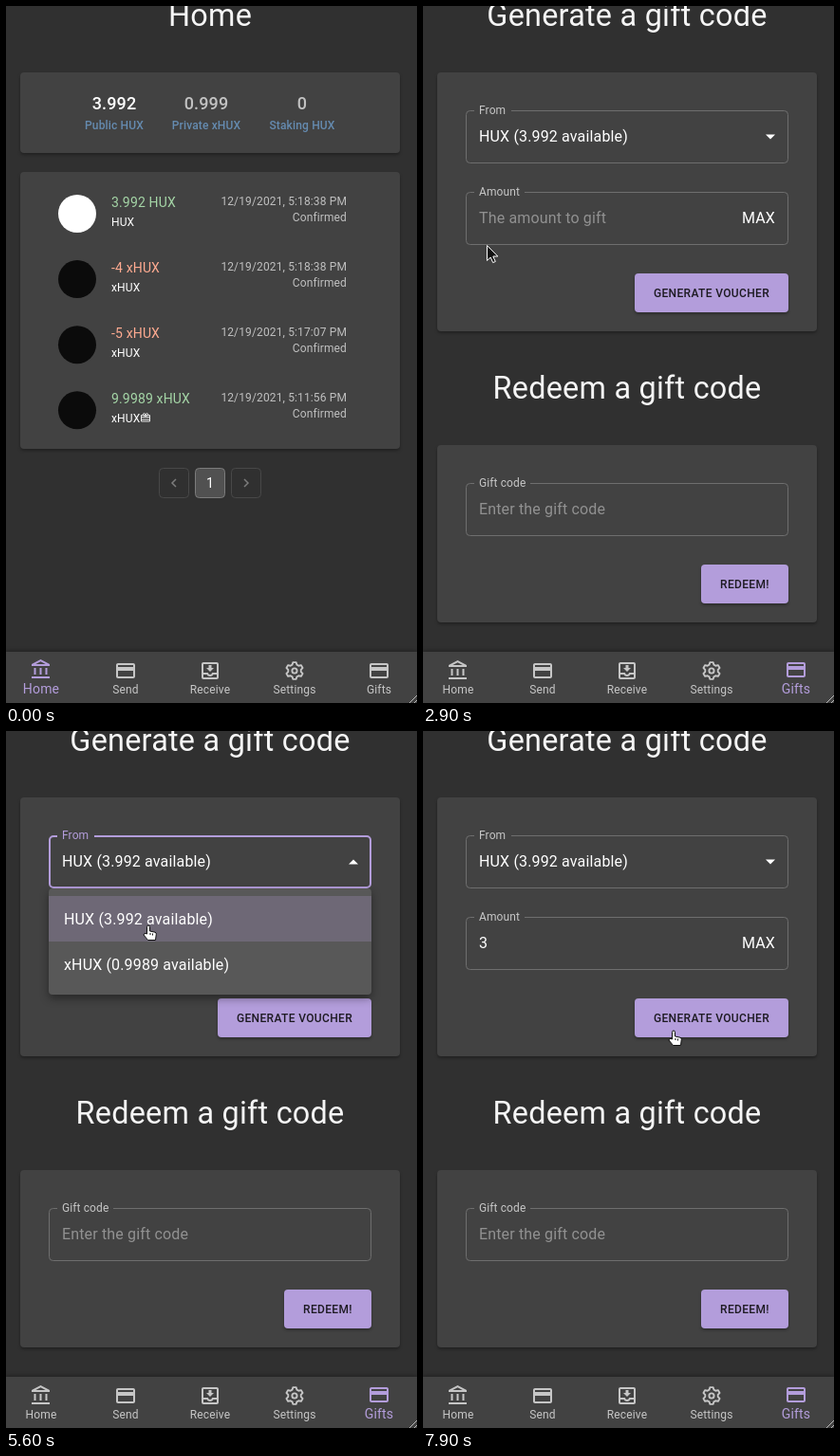
An HTML page that plays this animation: 433 by 735 pixels, repeating every 8000 ms.

```html
<!DOCTYPE html>
<html lang="en">
<head>
<meta charset="utf-8">
<title>Wallet gift codes</title>
<style>
html, body { margin: 0; width: 100%; height: 100%; overflow: hidden; background: #303030; }
svg { display: block; width: 433px; height: 735px; font-family: Roboto, sans-serif; }
.card { filter: drop-shadow(0 2px 1.5px rgba(0, 0, 0, .3)); }
.menu { filter: drop-shadow(0 4px 5px rgba(0, 0, 0, .4)); }
</style>
</head>
<body>
<svg id="stage" viewBox="0 0 433 735"></svg>
<script>
const LOOP = 8000, STEP = 100;
const PURPLE = [179, 157, 219], GREY = [198, 198, 198];
const LILAC = '#b39ddb', CARD = '#424242', LINE = '#6e6e6e', COIN = 'HUX';
const stage = document.getElementById('stage');

const ramp = (t, a, b) => Math.max(0, Math.min(1, (t - a) / (b - a)));
const pulse = (t, on, off, d = 200) => ramp(t, on, on + d) - ramp(t, off, off + d);
const within = (t, a, b) => t >= a && t < b;
const tint = k => `rgb(${GREY.map((g, i) => Math.round(g + (PURPLE[i] - g) * k))})`;

const text = (s, x, y, size, fill, { anchor = 'start', weight = 400, ls = .15 } = {}) =>
  `<text x="${x}" y="${y}" font-size="${size}" fill="${fill}" text-anchor="${anchor}" font-weight="${weight}" letter-spacing="${ls}">${s}</text>`;
const rect = (x, y, w, h, fill, r = 4, extra = '') =>
  `<rect x="${x}" y="${y}" width="${w}" height="${h}" rx="${r}" fill="${fill}" ${extra}/>`;
const frame = (x, y, w, h, color, width = 1, fill = 'none') =>
  rect(x + width / 2, y + width / 2, w - width, h - width, fill, 4, `stroke="${color}" stroke-width="${width}"`);
const card = (y, h) => rect(15, y, 400, h, CARD, 4, 'class="card"');
const title = (s, y) => text(s, 215, y, 32.4, '#f5f5f5', { anchor: 'middle', ls: .238 });

// Icons on a 24 unit grid
function gear() {
  const pts = [];
  for (let i = 0; i < 6; i++)
    for (const [r, a] of [[6.8, -21], [9, -11], [9, 11], [6.8, 21]]) {
      const q = (i * 60 + a) * Math.PI / 180;
      pts.push((12 + r * Math.sin(q)).toFixed(2) + ',' + (12 - r * Math.cos(q)).toFixed(2));
    }
  return `<g fill="none" stroke="currentColor" stroke-width="1.9" stroke-linejoin="round"><polygon points="${pts.join(' ')}"/><circle cx="12" cy="12" r="2.6"/></g>`;
}
const path = d => `<path fill="currentColor" d="${d}"/>`;
const bank = path('M6.5 10h-2v7h2zm6 0h-2v7h2zm8.5 9H2v2h19zm-2.5-9h-2v7h2zm-7-6.74L16.71 6H6.29zm0-2.26L2 6v2h19V6z');
const pay = path('M20 4H4c-1.1 0-2 .9-2 2v12c0 1.1.9 2 2 2h16c1.1 0 2-.9 2-2V6c0-1.1-.9-2-2-2zm0 14H4v-6h16zm0-10H4V6h16z');
const inbox = path('M16 9h-2.5V6h-3v3H8l4 4zM19 3H5c-1.1 0-2 .9-2 2v14c0 1.1.9 2 2 2h14c1.1 0 2-.9 2-2V5c0-1.1-.9-2-2-2zm0 16H5v-3h3.56c.69 1.19 1.97 2 3.45 2s2.75-.81 3.45-2H19zm0-5h-5c0 1.1-.9 2-2 2s-2-.9-2-2H5V5h14z');
const giftIcon = '<g transform="translate(141 428) scale(.5)" fill="none" stroke="#e8e8e8" stroke-width="2"><path d="M3 7h18v13H3zM3 16h18M3 11h18M12 7L8 12M12 7l4 5"/><circle cx="9" cy="5" r="2"/><circle cx="15" cy="5" r="2"/></g>';
const tabs = [['Home', 37, bank], ['Send', 126, pay], ['Receive', 215, inbox], ['Settings', 304, gear()], ['Gifts', 393, pay]];

function homePage() {
  let s = title('Home', 21) + card(70, 85) + card(175, 292);
  [['3.992', 'Public ' + COIN, 114, '#fff'], ['0.999', 'Private x' + COIN, 211, '#c2c2c2'], ['0', 'Staking ' + COIN, 312, '#c2c2c2']]
    .forEach(([n, label, x, fill]) => {
      s += text(n, x, 109, 18, fill, { anchor: 'middle', weight: 500 });
      s += text(label, x, 130, 12, '#658bb0', { anchor: 'middle', weight: 500 });
    });
  [['3.992 ', '', '5:18:38'], ['-4 ', 'x', '5:18:38'], ['-5 ', 'x', '5:17:07'], ['9.9989 ', 'x', '5:11:56']]
    .forEach(([n, kind, time], i) => {
      const y = i * 69.1;
      s += `<circle cx="75" cy="${219 + y}" r="20" fill="${kind ? '#0b0b0b' : '#fff'}"/>`;
      s += text(n + kind + COIN, 111, Math.round(212 + y), 14, n < 0 ? '#ffab91' : '#a5d6a7');
      s += text(kind + COIN, 111, Math.round(232 + y), 12, '#fff', { ls: .13 });
      s += text(`12/19/2021, ${time} PM`, 359, Math.round(210 + y), 12, '#c0c0c0', { anchor: 'end', ls: .13 });
      s += text('Confirmed', 359, Math.round(227 + y), 12, '#c0c0c0', { anchor: 'end', ls: .13 });
    });
  s += giftIcon + frame(161, 487, 32, 32, '#484848') + frame(199, 487, 32, 32, '#7c7c7c', 1, '#515151') + frame(237, 487, 32, 32, '#484848');
  s += text('1', 215, 508, 14, '#fff', { anchor: 'middle' });
  return s + '<path d="M179 499l-4 4 4 4M251 499l4 4-4 4" fill="none" stroke="#7c7c7c" stroke-width="1.5"/>';
}

function field(label, y, gap, focus, glow, hover) {
  const color = focus ? LILAC : hover ? '#fff' : LINE;
  return frame(45, y, 340, 56, color, focus ? 2 : 1) + rect(54, y - 1, gap, 4, CARD, 0) +
    text(label, 59, y + 4, 12, tint(glow), { ls: .11 });
}

const button = (s, x, y, w) => rect(x, y, w, 41, LILAC, 4, 'class="card"') +
  text(s, x + w / 2, y + 25, 12, '#1d1a22', { anchor: 'middle', weight: 500, ls: .343 });

function menu(t) {
  const k = pulse(t, 5000, 5900, 250);
  if (k <= 0) return '';
  const grow = t < 5900 ? k : 1;
  return `<g class="menu" opacity="${k}" transform="translate(215 166) scale(${.75 + .25 * grow} ${.56 + .44 * grow}) translate(-215 -166)">` +
    rect(45, 166, 340, 112, '#585858') + rect(45, 174, 340, 48, '#6e6876', 0) +
    text(COIN + ' (3.992 available)', 61, 204, 16, '#fff') +
    text(`x${COIN} (0.9989 available)`, 61, 252, 16, '#fff') + '</g>';
}

function giftPage(t) {
  const fromOn = within(t, 5000, 6300), open = within(t, 5000, 5900), typed = t >= 6700;
  const amountOn = within(t, 3200, 5000) || within(t, 6300, 7700);
  const hover = within(t, 3000, 3200) || within(t, 6200, 6300);
  let s = title('Generate a gift code', 21) + card(70, 273) + title('Redeem a gift code', 414) + card(463, 187);
  s += field('From', 110, 39, fromOn, pulse(t, 5000, 6300), within(t, 4700, 5000));
  s += text(COIN + ' (3.992 available)', 59, 143, 16, '#fff');
  s += `<path fill="#fff" d="${open ? 'M361 140.5h10l-5-5z' : 'M361 135.5h10l-5 5z'}"/>`;
  s += field('Amount', 196, 53, amountOn, pulse(t, 3200, 5000) + pulse(t, 6300, 7700), hover);
  s += typed ? text('3', 59, 229, 16, '#fff') : text('The amount to gift', 59, 229, 16, '#919191');
  if (within(t, 6300, 7100)) s += rect(typed ? 68 : 59, 214, 1, 19, '#fff', 0);
  s += text('MAX', 336, 229, 16, '#fff');
  s += button('GENERATE VOUCHER', 223, 282, 162);
  s += field('Gift code', 503, 59, false, 0);
  s += text('Enter the gift code', 59, 536, 16, '#919191') + button('REDEEM!', 293, 589, 92);
  return s + menu(t);
}

function tabBar(t) {
  const moved = ramp(t, 2000, 2300);
  let s = rect(0, 681, 433, 54, CARD, 0, 'style="filter:drop-shadow(0 -1px 2px rgba(0,0,0,.35))"');
  tabs.forEach(([name, x, icon], i) => {
    const k = i === 0 ? 1 - moved : i === 4 ? moved : 0;
    s += `<g color="${tint(k)}" transform="translate(${x - 12} ${689 - k})">${icon}</g>`;
    s += text(name, x, 725, 12 + 2 * k, tint(k), { anchor: 'middle' });
  });
  if (within(t, 1900, 2400)) {
    const r = 29 + (t - 2000) * .13, a = .23 * (1 - ramp(t, 2000, 2400));
    s += `<clipPath id="bar"><rect x="348" y="682" width="85" height="53"/></clipPath>` +
      `<circle cx="388" cy="711" r="${r}" fill="#fff" opacity="${a}" clip-path="url(#bar)"/>`;
  }
  return s + '<path d="M425 735l8-8M430 735l3-3" stroke="#bbb" fill="none"/>';
}

// Pointer stops: time, x, y, shape
const stops = [
  [1000, 420, 720, 'arrow'], [1100, 365, 674, 'arrow'], [1200, 382, 704, 'hand'], [1300, 391, 711, 'hand'],
  [2700, 250, 572, 'arrow'], [2800, 110, 350, 'arrow'], [2900, 67, 252, 'arrow'], [3000, 88, 225, 'beam'],
  [3700, 88, 221, 'beam'], [3800, 89, 218, 'beam'], [4500, 94, 217, 'beam'], [4600, 112, 196, 'beam'],
  [4700, 130, 162, 'hand'], [4800, 140, 148, 'hand'], [4900, 146, 136, 'hand'], [5400, 147, 160, 'hand'],
  [5500, 149, 190, 'hand'], [5600, 150, 205, 'hand'], [6100, 135, 218, 'hand'], [6200, 124, 232, 'beam'],
  [6300, 123, 236, 'beam'], [6800, 150, 258, 'arrow'], [6900, 195, 292, 'arrow'], [7000, 238, 320, 'hand'],
  [7100, 250, 325, 'hand'], [7200, 256, 321, 'hand'], [7300, 262, 317, 'hand'], [7400, 264, 316, 'hand']
];
const beam = 'M-3-6.5h2l1 1 1-1h2M0-5.5v11M-3 6.5h2l1-1 1 1h2';
const shapes = {
  arrow: '<path d="M.5.5v16l3.7-3.5 2.5 5.6 2.6-1.1-2.5-5.5h5z" fill="#111" stroke="#fff"/>',
  hand: '<path d="M-1.5 9V1.5a1.5 1.5 0 0 1 3 0V6l5.5 1.2q1.5.5 1.3 2L7.5 15.5h-8L-5 10q.5-2 2-1.5z" fill="#fff" stroke="#111"/><path d="M2 8v2M4.5 8.5v2" stroke="#111"/>',
  beam: `<g fill="none"><path d="${beam}" stroke="#111" stroke-width="3"/><path d="${beam}" stroke="#fff"/></g>`
};
function pointer(t) {
  const stop = stops.filter(p => p[0] <= t).pop();
  return stop ? `<g transform="translate(${stop[1]} ${stop[2]})">${shapes[stop[3]]}</g>` : '';
}

let last = -1;
function draw(now) {
  const t = Math.floor(now % LOOP / STEP) * STEP;
  if (t !== last) {
    stage.innerHTML = (t < 2100 ? homePage() : giftPage(t)) + tabBar(t) + pointer(t);
    last = t;
  }
  requestAnimationFrame(draw);
}
draw(performance.now());
</script>
</body>
</html>
```
